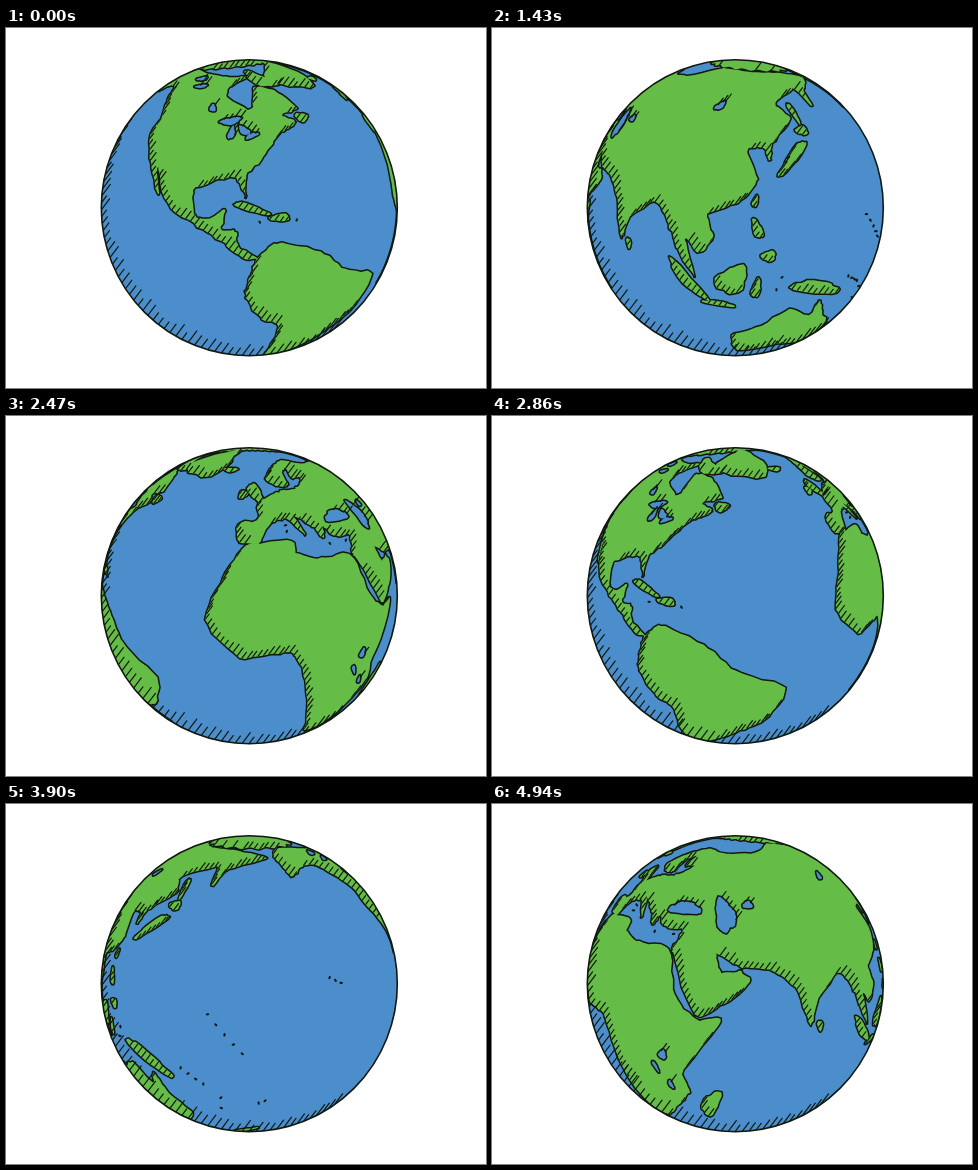
An HTML page with a canvas for the animation above (5070 ms loop, 480 px wide and 360 px high).

```html
<!DOCTYPE html>
<html>
<head>
<meta charset="utf-8">
<style>
html, body { margin: 0; width: 100%; height: 100%; overflow: hidden; background: #fff; }
canvas { display: block; }
</style>
</head>
<body>
<canvas id="stage" width="480" height="360"></canvas>
<script>
const ctx = document.getElementById('stage').getContext('2d');
const { sin, cos, hypot, PI } = Math, RAD = PI / 180;
const CX = 243.3, CY = 179.7, R = 148;
const TILT = 22 * RAD, DIST = 3; // camera latitude and distance in globe radii
const STEP = 130, LOOP = 5070, POSES = 23;
const BLUE = '#4b8ecb', GREEN = '#65bc46', INK = '#10180f';

// Key points of the coasts, counterclockwise lon, lat pairs
const northAmerica = coast([-166,66,-164,60,-162,55,-152,59,-140,60,-132,55,-124,47,-124,40,-117,32,
  -110,23,-113,31,-106,21,-95,16,-87,12,-82,8,-77,7.5,-83,11,-84,15.5,-88,16,-87,21.3,-91,19,-96,19,
  -97.5,26,-90,29.5,-84,30,-81,25,-81,31,-75,36,-70,42,-64,45,-60,47,-65,50,-56,52,-64,60,-77,62,
  -79,52,-92,57,-93,62,-83,68,-100,68,-128,70,-156,71]);
const southAmerica = coast([-78,7,-80,1,-81,-5,-76,-14,-70.5,-18,-73,-40,-70,-55,-65,-45,-58,-37,
  -48,-27,-40,-21,-35,-7,-50,0,-59,8,-72,12]);
const africa = coast([-6,36,-13,27,-17.5,15,-8,4.5,5,5.5,9,3,13,-10,18,-33,26,-34,35,-22,40.5,-14,
  39.5,-5,51,11.5,43.5,11.5,37,18,32.5,30.5,20,31,11,33.5,10,37]);
const eurasia = coast([28,71,12,66,5,60,12,56,17,57,18,63,24,65.5,22,60,29,60,21,55.5,12,54.5,8,53.5,
  -1,50,-1.5,44,-9,43,-9,37.5,-2,36.8,3,42.5,10,44,16,38.5,13.5,45,20,41,23,37,25,40.5,28,37,36,36.5,
  34,31,35,28.5,43.5,13,52,16.5,59.5,22.5,56,25.5,51,25,49,30,57,26.5,67,25,73,20,77.5,8.5,80.5,15.5,
  90,22,95,16,98.5,9,103.5,1.5,100.5,12.5,105,9,108.5,14,107,20,117,24,122,30,119,38,125,39,127,35,
  129,40,140,48,136,54,155,60,157,51.5,163,59,188,65,160,70,128,72,100,75,72,68,45,68]);
const australia = coast([114,-22,116,-34,131,-31.5,138,-35,147,-38,153,-28,146,-18,142.5,-11,140,-17,
  132,-11.5,122,-18]);
const arctic = Array.from({ length: 120 }, (_, i) =>
  [i * 3, 77.5 + 6 * cos(i * 3 * RAD) + 0.8 * sin(i * 1.1)]);

// Ovals: lon, lat, half length, half width, angle
const islands = [
  [-42, 71.5, 11.5, 6.5, 80], [-73, 67, 6.5, 2.5, 130], [-19, 65, 2.2, 1.2, 0],      // northern Atlantic
  [-2, 54, 4.2, 1.7, 110], [-8, 53.3, 1.7, 1.2, 60], [-56, 48.5, 2, 1.6, 0],
  [-79.5, 21.8, 5, 0.9, -18], [-71, 19, 2.8, 1, 0],                                  // Caribbean
  [47, -19, 7, 2.4, 72], [80.7, 7.6, 1.6, 0.9, 100],                                 // Indian Ocean
  [136, 35.5, 7, 1.4, 42], [143, 43.4, 2, 1.5, 0], [143, 50, 4, 0.8, 95],            // Japan, Sakhalin
  [121, 23.6, 1.6, 0.7, 70], [121.3, 16, 2.8, 1.2, 110], [124.5, 8, 2, 1.5, 0],      // Taiwan, Philippines
  [101, 0, 8, 1.6, -48], [114, 1, 5, 3.8, 45], [110, -7.3, 4.8, 0.8, -8],            // Indonesia
  [121, -2, 3.2, 1.2, 80], [141, -5.5, 10, 2.2, -22], [172.5, -41, 6.5, 1.3, 50]
].map(oval);
const lakes = [
  [34.5, 43.3, 5, 2, 0], [51, 41.8, 5.5, 2.6, 105], [60, 45, 1.4, 1.2, 0], [107.5, 53.5, 2, 0.9, 50],
  [33, -1, 1.6, 1.2, 70], [30, -6, 2, 0.6, 115], [34.5, -12, 1.7, 0.7, 105],         // Africa
  [-88, 47.7, 3, 1.2, 15], [-87, 43.7, 2.1, 0.9, 80], [-82, 44.5, 2, 1.1, -40],      // North America
  [-79, 42.8, 2, 0.7, 25], [-98, 52.3, 1.5, 0.9, 110], [-121, 66, 2, 1.2, 20], [-114, 61.7, 2.2, 0.9, 15]
].map(oval);
const land = [northAmerica, southAmerica, africa, eurasia, australia, arctic, ...islands];

// Rows of specks: lon, lat, step east, step north, count
const specks = [
  [-155.5, 19.6, -2, 1.1, 3], [163, 13, 2.5, -2.8, 5], [154, -5.5, 2.3, -1.6, 4], [166, -15.5, -0.4, -5.5, 2],
  [178, -17.5, 2, 1, 2], [-77, 18, 11, 0, 2], [9, 40, 0, 2, 2], [25, 35, 8, 0, 2], [127, -3, 1.5, 4, 2]
].flatMap(([lon, lat, dx, dy, n]) => Array.from({ length: n }, (_, i) => [lon + i * dx, lat + i * dy]));

// Smooth closed curve through the key points with a hand-drawn wobble
function coast(flat) {
  const n = flat.length / 2, steps = 6;
  const key = i => flat.slice((i + n) % n * 2, (i + n) % n * 2 + 2);
  return Array.from({ length: n * steps }, (_, j) => {
    const i = Math.floor(j / steps), t = j % steps / steps;
    const [a, b, c, d] = [key(i - 1), key(i), key(i + 1), key(i + 2)];
    const [lon, lat] = [0, 1].map(k => {
      const ease = t * t * (3 - 2 * t);
      return b[k] + (c[k] - b[k]) * ease + 0.35 * t * (1 - t) *
        ((1 - t) * (c[k] - a[k]) - t * (d[k] - b[k]));
    });
    return [lon + 0.3 * sin(lat * 9 + lon), lat + 0.3 * sin(lon * 7 + lat)];
  });
}

function oval([lon, lat, a, b, deg]) {
  const c = cos(deg * RAD), s = sin(deg * RAD);
  return Array.from({ length: 24 }, (_, i) => {
    const t = i * PI / 12, r = 1 + 0.16 * sin(3 * t + lon) + 0.06 * sin(7 * t);
    const x = a * r * cos(t), y = b * r * sin(t);
    return [lon + (x * c - y * s) / cos(lat * RAD), lat + x * s + y * c];
  });
}

// Perspective view; points behind the horizon slide onto the rim
function project([lon, lat], lon0) {
  const a = (lon - lon0) * RAD, b = lat * RAD;
  const x = cos(b) * sin(a), y = cos(TILT) * sin(b) - sin(TILT) * cos(b) * cos(a);
  const depth = sin(TILT) * sin(b) + cos(TILT) * cos(b) * cos(a), seen = depth > 1 / DIST;
  const k = R * (seen ? Math.sqrt(DIST * DIST - 1) / (DIST - depth) : 1 / hypot(x, y));
  return { x: CX + x * k, y: CY - y * k, seen };
}

const view = (shapes, lon0) =>
  shapes.map(s => s.map(p => project(p, lon0))).filter(s => s.some(p => p.seen));

function outline(shapes) {
  const path = new Path2D();
  for (const s of shapes) {
    s.forEach(p => path.lineTo(p.x, p.y));
    path.closePath();
    path.moveTo(0, 0);
  }
  return path;
}

function trace(shapes) {
  const path = new Path2D();
  for (const s of shapes) {
    path.moveTo(s[0].x, s[0].y);
    s.forEach(p => path.lineTo(p.x, p.y));
    path.closePath();
  }
  return path;
}

function paint(path, fill) {
  ctx.lineWidth = 3;
  ctx.stroke(path);
  ctx.fillStyle = fill;
  ctx.fill(path);
}

function tick(x, y, size) {
  const s = size * (0.85 + 0.25 * sin(x * 3 + y * 5));
  ctx.moveTo(x, y);
  ctx.lineTo(x + 0.6 * s, y - 0.8 * s);
}

// Short strokes on shores that have water below and to the left
function hatchShore(pts, isLand) {
  let gap = 3;
  pts.forEach((p, i) => {
    const q = pts[(i + 1) % pts.length], len = hypot(q.x - p.x, q.y - p.y);
    for (; gap < len; gap += 5.5) {
      const x = p.x + (q.x - p.x) * gap / len, y = p.y + (q.y - p.y) * gap / len;
      if (hypot(x - CX, y - CY) < R * 0.975 && !isLand(x - 2, y + 2.5) && isLand(x + 2, y - 2.5))
        tick(x, y, 9);
    }
    gap -= len;
  });
}

function draw(lon0) {
  const disc = new Path2D();
  disc.arc(CX, CY, R, 0, 2 * PI);
  ctx.clearRect(0, 0, 480, 360);
  ctx.strokeStyle = INK;
  ctx.lineJoin = ctx.lineCap = 'round';
  ctx.save();
  ctx.fillStyle = BLUE;
  ctx.fill(disc);
  ctx.clip(disc);

  const ground = view(land, lon0), pools = view(lakes, lon0);
  const groundPath = trace(ground), poolPath = trace(pools);
  paint(groundPath, GREEN);
  paint(poolPath, BLUE);

  const isLand = (x, y) => ctx.isPointInPath(groundPath, x, y) && !ctx.isPointInPath(poolPath, x, y);
  ctx.lineWidth = 1.2;
  ctx.save();
  ctx.clip(groundPath);
  ctx.beginPath();
  [...ground, ...pools].forEach(s => hatchShore(s, isLand));
  ctx.stroke();
  ctx.restore();

  // Shading along the lower left rim
  ctx.beginPath();
  for (let a = 55; a < 228; a += 2.7) tick(CX + R * cos(a * RAD), CY + R * sin(a * RAD), 13);
  ctx.stroke();

  ctx.fillStyle = INK;
  specks.map(p => project(p, lon0)).filter(p => p.seen).forEach((p, i) => {
    ctx.beginPath();
    ctx.ellipse(p.x, p.y, 1.8, 1.1, i, 0, 2 * PI);
    ctx.fill();
  });
  ctx.restore();

  ctx.lineWidth = 1.6;
  ctx.stroke(disc);
}

let shown = -1;
function frame() {
  const pose = Math.floor(performance.now() % LOOP / STEP) % POSES;
  if (pose !== shown) draw(-80 - 15 * pose);
  shown = pose;
  requestAnimationFrame(frame);
}
frame();
</script>
</body>
</html>
```
